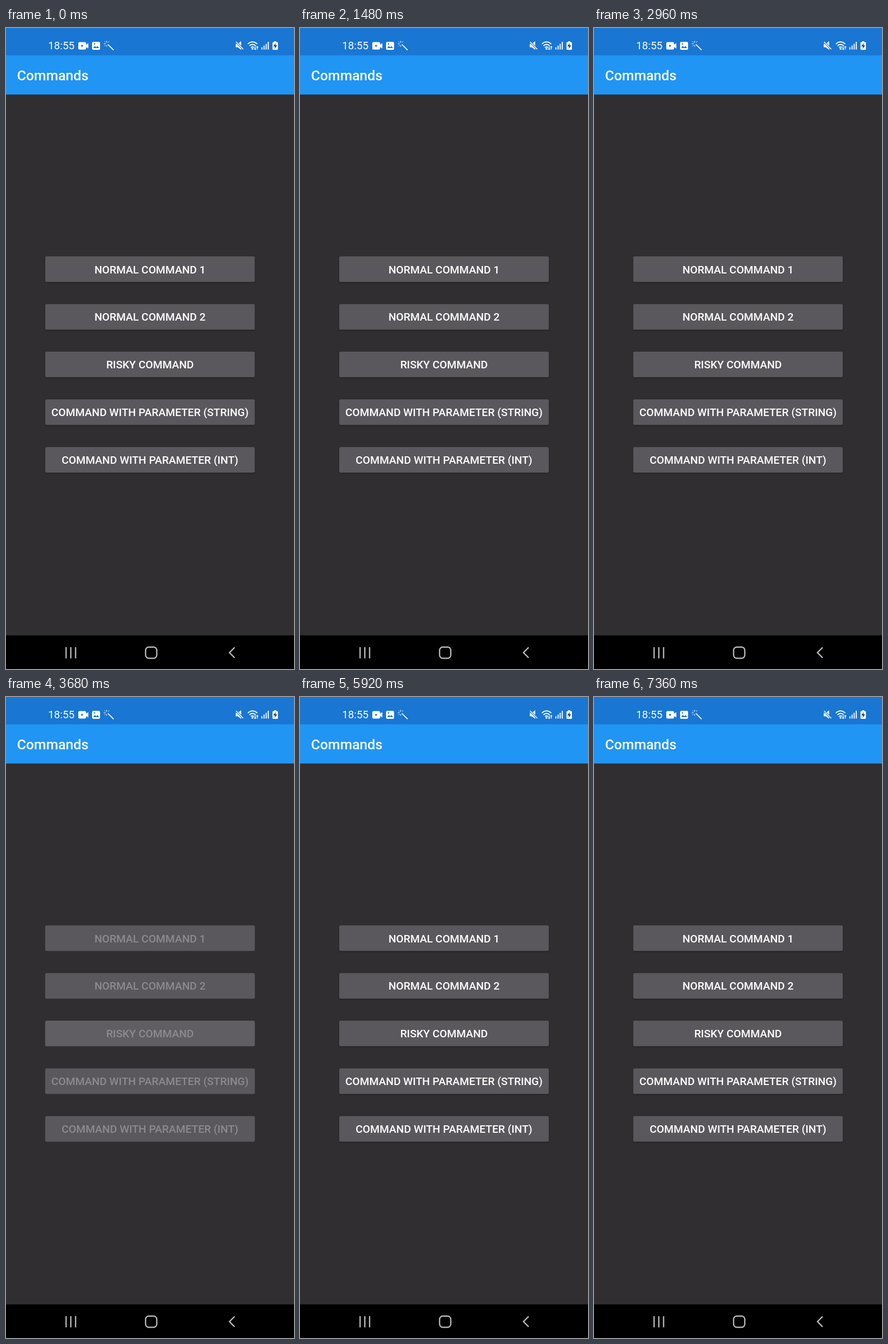
These frames come from a looping animation (502x1115 px, 8.8 s). An HTML page:

```html
<!DOCTYPE html>
<html lang="en">
<head>
<meta charset="utf-8">
<title>Commands</title>
<style>
  html, body { margin: 0; width: 100%; height: 100%; overflow: hidden; background: #000; }
  svg { display: block; width: 502px; height: 1115px; font-family: Roboto, sans-serif; }
  .label { font-size: 18.8px; font-weight: 500; text-anchor: middle; fill: #fff; }
  .face { fill: #5a585c; filter: drop-shadow(0 1px 1px #0006); }
  .disabled .label { fill: #8b8a8d; }
  .disabled .face { filter: none; }
  .line { fill: none; stroke: #fff; }
</style>
</head>
<body>
<svg viewBox="0 0 502 1115">
  <rect width="502" height="1115" fill="#302e31"/>
  <rect width="502" height="48" fill="#1976d3"/>
  <rect y="47.5" width="502" height="68.200" fill="#2195f3"/>
  <rect y="1056.500" width="502" height="59"/>

  <g fill="#fff">
    <text x="73.500" y="37.400" font-size="18.400">18:55</text>
    <text x="19.300" y="91" font-size="24.200" font-weight="500">Commands</text>
    <path d="M128 24.500h9.500q2 0 2 2v2.500l4-2.800v9.600l-4-2.800v2.500q0 2-2 2H128q-2 0-2-2v-9q0-2 2-2z"/>
    <circle cx="132.500" cy="31" r="1.700" fill="#1976d3"/>
    <rect x="150" y="24" width="14" height="14" rx="2.500"/>
    <path d="M152 35l3-4 2.300 2.700 2-2.500 3 3.800z" fill="#1976d3"/>
    <circle cx="154.200" cy="27.800" r="1.200" fill="#1976d3"/>
    <path class="line" stroke-width="1.700" d="M177.500 28.500l10 9.800"/>
    <path class="line" stroke-width="1" d="M175.500 22.500v3M170.500 27.500h3M171.800 23.500l1.800 1.800M180 23.300l-1.800 1.800M172 31.500l1.800-1.800M175.500 30v2.500"/>
    <path d="M400.500 27.500h3.500l6-4.500v15l-6-4.500h-3.500z"/>
    <path d="M400.500 23.500l13 13.500" stroke="#1976d3" stroke-width="3.500"/>
    <path class="line" stroke-width="1.400" d="M401 24l12.500 13"/>
    <path class="line" stroke-width="1.700" d="M421.500 27.800q8-7.500 16.500 0M424.300 31q5.500-5 11 0M427 34q2.800-2.500 5.400 0"/>
    <circle cx="429.700" cy="36.200" r="1.600"/>
    <path class="line" stroke-width="1.300" d="M434.300 32v5.500m-1.500-1.600l1.500 1.600 1.500-1.600M438 37.500V32m-1.500 1.600L438 32l1.500 1.600"/>
    <path class="line" stroke-width="1.800" d="M446 37.500v-4M449.800 37.500v-7M453.500 37.500v-10M457.200 37.500V24"/>
    <path d="M467.500 23h3.500v1.500h1.500q1.500 0 1.500 1.500v10.500q0 1.500-1.500 1.500H466q-1.500 0-1.500-1.500V26q0-1.500 1.500-1.500h1.500z"/>
    <path d="M470.300 26l-4.300 6h3l-.8 4.500 4.300-6.200h-3z" fill="#143a64"/>
  </g>

  <g id="buttons"></g>

  <g fill="none" stroke="#bdbdbd" stroke-width="2.200">
    <path d="M104.700 1077v19.500M113 1077v19.500M121.300 1077v19.500"/>
    <rect x="243.300" y="1076.800" width="19.500" height="19.500" rx="5.500"/>
    <path d="M398.500 1077.500l-9 9 9 9"/>
  </g>
</svg>
<script>
const LOOP = 8800, STEP = 40;
const LEFT = 68.3, WIDTH = 365.4, HEIGHT = 44.5, CENTER = 251;
const START_RADIUS = 0.3 * WIDTH, END_RADIUS = Math.hypot(WIDTH, HEIGHT) / 2;
const GROW = 225, FADE_IN = 75, FADE_OUT = 150, STRENGTH = 0.2;
const TOUCH = { x: 78, y: 9 };

const labels = ['NORMAL COMMAND 1', 'NORMAL COMMAND 2', 'RISKY COMMAND',
  'COMMAND WITH PARAMETER (STRING)', 'COMMAND WITH PARAMETER (INT)'];

// touch: ripple begins; from/to: commands are disabled; settle: ripple stops changing
const presses = [
  { touch: 280, from: 320, settle: 680, to: 1480 },
  { touch: 1930, from: 2000, settle: 2280, to: 2960 },
  { touch: 3330, from: 3400, settle: 3680, to: 4440 },
  { touch: 4840, from: 4880, settle: 5240, to: 5920 },
  { touch: 6280, from: 6320, settle: 6680, to: 7360 },
];

const group = document.getElementById('buttons');
const buttonY = i => 397.3 + i * 82.9;

group.innerHTML = labels.map((label, i) => {
  const box = `x="${LEFT}" y="${buttonY(i)}" width="${WIDTH}" height="${HEIGHT}" rx="2.5"`;
  return `<clipPath id="clip${i}"><rect ${box}/></clipPath>
    <rect class="face" ${box}/>
    <g clip-path="url(#clip${i})"><circle class="ripple" fill="#fff" opacity="0"/></g>
    <text class="label" x="${CENTER}" y="${buttonY(i) + 29.2}">${label}</text>`;
}).join('');
const ripples = group.querySelectorAll('.ripple');

const clamp = v => Math.min(1, Math.max(0, v));

// cubic-bezier(0.4, 0, 0.2, 1)
function ease(x) {
  let low = 0, high = 1, s;
  for (let k = 0; k < 20; k++) {
    s = (low + high) / 2;
    const bx = 1.2 * s * (1 - s) ** 2 + 0.6 * s * s * (1 - s) + s ** 3;
    if (bx < x) low = s; else high = s;
  }
  return s * s * (3 - 2 * s);
}

function draw(now) {
  const t = Math.floor((now % LOOP) / STEP) * STEP;
  group.classList.toggle('disabled', presses.some(p => t >= p.from && t < p.to));
  presses.forEach((p, i) => {
    const ripple = ripples[i];
    const age = Math.min(t, p.settle) - p.touch;
    const active = t >= p.from && t < p.to;
    const grown = ease(clamp(age / GROW));
    const alpha = clamp(age / FADE_IN) * (1 - clamp((age - GROW) / FADE_OUT));
    ripple.setAttribute('cx', CENTER + TOUCH.x * (1 - grown));
    ripple.setAttribute('cy', buttonY(i) + HEIGHT / 2 + TOUCH.y * (1 - grown));
    ripple.setAttribute('r', START_RADIUS + (END_RADIUS - START_RADIUS) * grown);
    ripple.setAttribute('opacity', active ? STRENGTH * alpha : 0);
  });
}

function tick() {
  draw(performance.now());
  requestAnimationFrame(tick);
}
tick();
</script>
</body>
</html>
```
